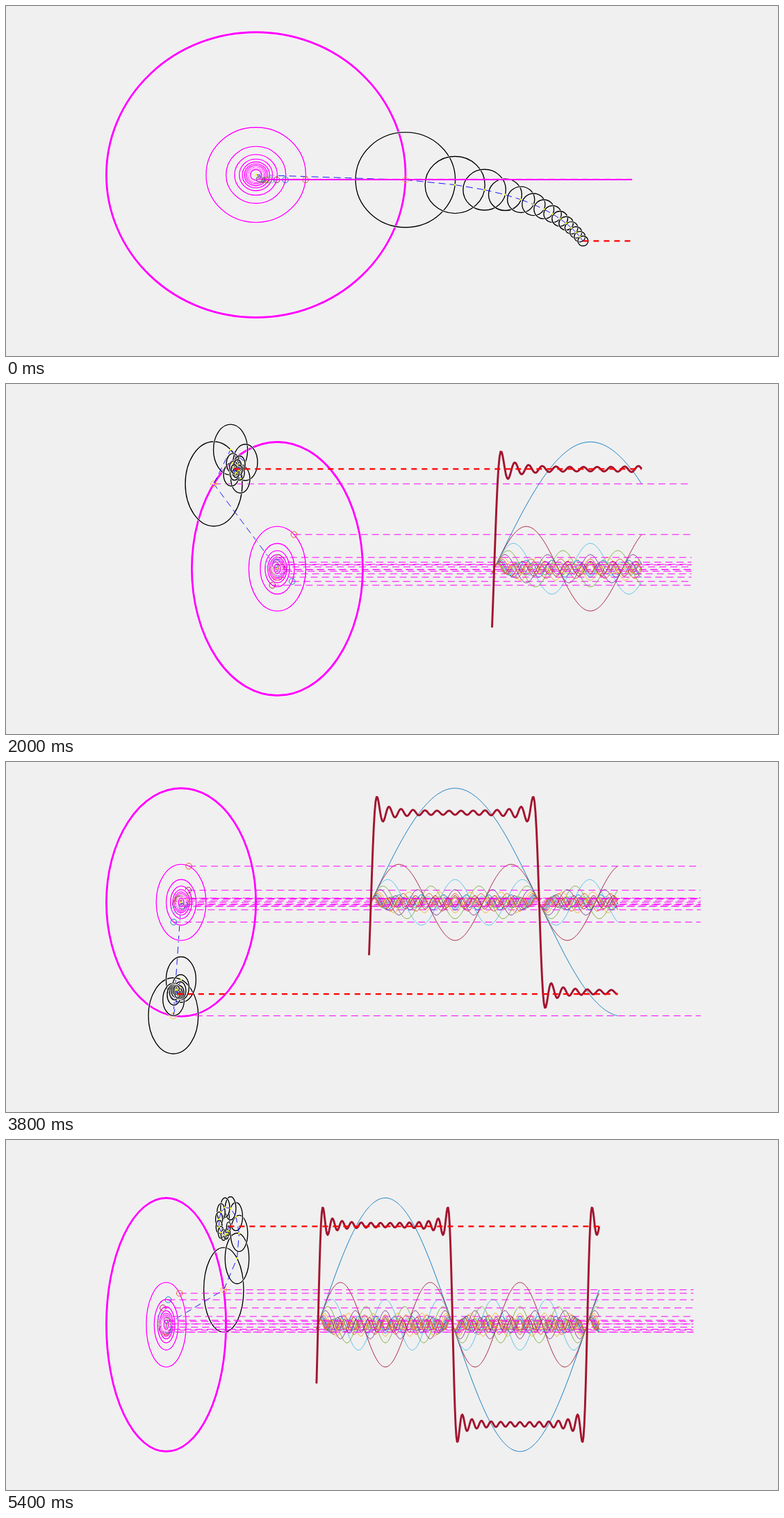
These frames come from a looping animation (1111x504 px, 5500 ms). An HTML page with a canvas:

```html
<!DOCTYPE html>
<html lang="en">
<head>
<meta charset="utf-8">
<title>Square wave from rotating circles</title>
<style>
  html, body { margin: 0; width: 100%; height: 100%; overflow: hidden; background: #f0f0f0; }
  canvas { display: block; }
</style>
</head>
<body>
<canvas id="stage" width="1111" height="504"></canvas>
<script>
const ctx = document.getElementById('stage').getContext('2d');
const WIDTH = 1111, HEIGHT = 504;
const BOX = { x: WIDTH * 0.13, y: HEIGHT * 0.075, w: WIDTH * 0.775, h: HEIGHT * 0.815 };
const STEPS = 55, STEP_MS = 100, TERMS = 14;
const FIRST_DEG = -2, DEG_PER_STEP = 7;
const WAVE_X = 2.5125, WAVE_PER_DEG = 0.0125;
const PALETTE = ['#0072bd', '#d95319', '#edb120', '#7e2f8e', '#77ac30', '#4dbeee', '#a2142f'];
const MAGENTA = '#ff00ff';
const THIN = 0.9;

const orders = Array.from({ length: TERMS }, (_, i) => 2 * i + 1);
const rad = deg => deg * Math.PI / 180;
const harmonic = (n, deg) => Math.sin(rad(n * deg)) / n;
const squareSum = deg => orders.reduce((sum, n) => sum + harmonic(n, deg), 0);
const color = i => PALETTE[((i % 7) + 7) % 7];

// Axis limits snap outwards to a round tick step.
function niceLimits(lo, hi) {
  const range = hi - lo;
  const tick = range <= 2.5 ? 0.25 : range <= 5 ? 0.5 : 1;
  return [Math.floor(lo / tick + 1e-9) * tick, Math.ceil(hi / tick - 1e-9) * tick];
}

function makeAxes(circles, right) {
  const [x0, x1] = niceLimits(
    Math.min(...circles.map(c => c.x - c.r)),
    Math.max(right, ...circles.map(c => c.x + c.r)));
  const [y0, y1] = niceLimits(
    Math.min(...circles.map(c => c.y - c.r)),
    Math.max(...circles.map(c => c.y + c.r)));
  const sx = BOX.w / (x1 - x0), sy = BOX.h / (y1 - y0);
  return { sx, sy, px: x => BOX.x + (x - x0) * sx, py: y => BOX.y + (y1 - y) * sy };
}

function stroke(style, width, dash = []) {
  ctx.strokeStyle = style;
  ctx.lineWidth = width;
  ctx.setLineDash(dash);
  ctx.stroke();
}

function draw(step) {
  const deg = FIRST_DEG + step * DEG_PER_STEP;
  const waveEnd = WAVE_X + step * DEG_PER_STEP * WAVE_PER_DEG;
  const guideEnd = WAVE_X + step * DEG_PER_STEP * WAVE_PER_DEG * 4 / 3;

  const joints = [{ x: 0, y: 0, r: 1 }];
  orders.forEach((n, i) => {
    const last = joints[i];
    joints.push({
      x: last.x + Math.cos(rad(n * deg)) / n,
      y: last.y + harmonic(n, deg),
      r: 1 / (n + 2)
    });
  });
  const { sx, sy, px, py } = makeAxes(joints, guideEnd);

  const ring = (x, y, r, style, width) => {
    ctx.beginPath();
    ctx.ellipse(px(x), py(y), r * sx, r * sy, 0, 0, 2 * Math.PI);
    stroke('#fff', width + 1.33);
    stroke(style, width);
  };
  const line = (xa, ya, xb, yb, style, width, dash) => {
    ctx.beginPath();
    ctx.moveTo(px(xa), py(ya));
    ctx.lineTo(px(xb), py(yb));
    stroke(style, width, dash);
  };
  const wave = (fn, style, width) => {
    ctx.beginPath();
    for (let d = FIRST_DEG; d <= deg; d++) {
      ctx.lineTo(px(WAVE_X + (d - FIRST_DEG) * WAVE_PER_DEG), py(fn(d)));
    }
    stroke(style, width);
  };

  ctx.fillStyle = '#f0f0f0';
  ctx.fillRect(0, 0, WIDTH, HEIGHT);
  ctx.lineJoin = 'round';

  orders.forEach((n, i) => {
    const from = joints[i], to = joints[i + 1];
    const x = Math.cos(rad(n * deg)) / n, y = harmonic(n, deg);
    ring(0, 0, 1 / n, MAGENTA, i ? 1.4 : 2.9);
    ring(to.x, to.y, to.r, '#000', 1.4);
    line(from.x, from.y, to.x, to.y, '#00f', THIN, [10, 6]);
    wave(d => harmonic(n, d), color(-i), THIN);
    line(x, y, guideEnd, y, MAGENTA, 1, [10, 6]);
    ctx.beginPath();
    ctx.arc(px(x), py(y), 4.3, 0, 2 * Math.PI);
    stroke(color(2 - i), THIN);
    ctx.fillStyle = '#ff0';
    ctx.beginPath();
    ctx.arc(px(from.x), py(from.y), 1.4, 0, 2 * Math.PI);
    ctx.fill();
  });

  const tip = joints[TERMS];
  wave(squareSum, '#a2142f', 2.9);
  line(tip.x, tip.y, waveEnd, tip.y, '#f00', 2.3, [8, 7]);
}

let shown = -1;
const start = performance.now();
function tick() {
  const step = Math.floor((performance.now() - start) / STEP_MS) % STEPS;
  if (step !== shown) draw(shown = step);
  requestAnimationFrame(tick);
}
tick();
</script>
</body>
</html>
```
